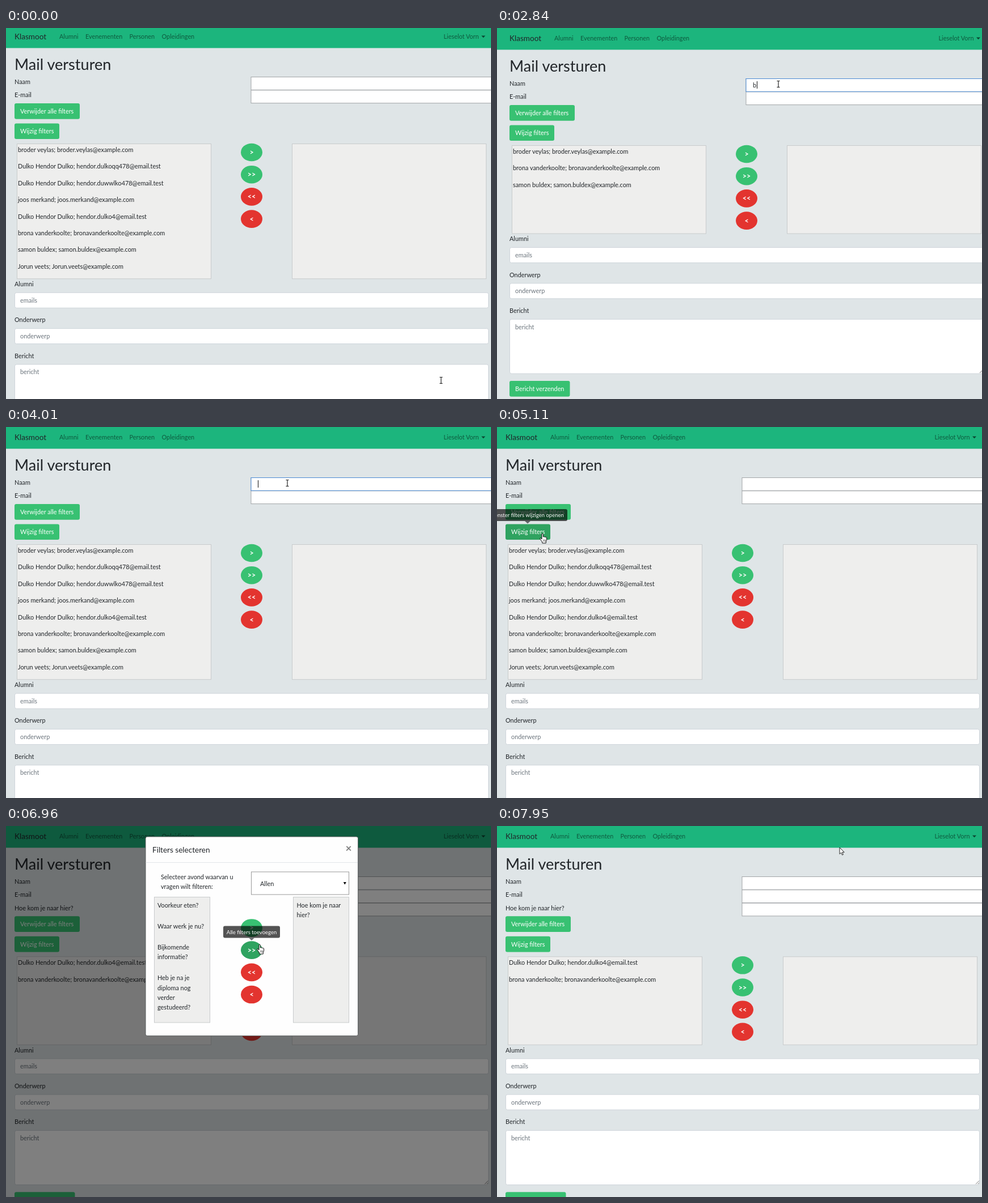
Recreate the animation shown at these times as an HTML page. Size 855 by 655 pixels, loop 8 s.

```html
<!DOCTYPE html>
<html lang="nl">
<head>
<meta charset="utf-8">
<title>Mail versturen</title>
<style>
html, body { margin: 0; width: 100%; height: 100%; overflow: hidden; background: #dfe5e7; }
svg { display: block; width: 855px; height: 655px; font: 10.86px Lato, sans-serif; fill: #212529; }
</style>
</head>
<body>
<svg id="stage" viewBox="0 0 855 655" xmlns="http://www.w3.org/2000/svg"></svg>
<script>
const LOOP = 8000;
const GREEN = '#38c172', HOVER = '#2fa360', RED = '#e3342f', HINT = '#6c757d';
const ROW = 23.3, LINE = 17.35, CIRCLE_GAP = 39.2;
const stage = document.getElementById('stage');

const people = [
  'broder veylas; broder.veylas@example.com',
  'Dulko Hendor Dulko; hendor.dulkoqq478@email.test',
  'Dulko Hendor Dulko; hendor.duwwlko478@email.test',
  'joos merkand; joos.merkand@example.com',
  'Dulko Hendor Dulko; hendor.dulko4@email.test',
  'brona vanderkoolte; bronavanderkoolte@example.com',
  'samon buldex; samon.buldex@example.com',
  'Jorun veets; Jorun.veets@example.com'
];
const questions = [
  ['Voorkeur eten?'],
  ['Waar werk je nu?'],
  ['Hoe kom je naar', 'hier?'],
  ['Bijkomende', 'informatie?'],
  ['Heb je na je', 'diploma nog', 'verder', 'gestudeerd?']
];
const CHOSEN = 2;

// [time, typed value]
const typing = [[0, ''], [1600, 'b'], [1770, 'br'], [2840, 'b'], [3010, ''],
  [3160, 's'], [3310, 'sa'], [3860, 's'], [4010, '']];
const caretX = { '': 0, b: 7, br: 11, s: 5, sa: 11 };
const caretOff = [[1310, 1600], [2300, 2760], [4560, 5060]];

// [start, end, steps, from, to]
const moves = [
  [70, 760, 10, [767, 622], [496, 99]],
  [4410, 5030, 9, [496, 99], [80, 188]],
  [5640, 6010, 6, [80, 188], [307, 222]],
  [6320, 6880, 8, [307, 222], [447, 209]],
  [7120, 7800, 10, [447, 209], [604, 38]]
];

const within = (v, a, b) => v >= a && v < b;
const inBox = ([x, y], l, t, r, b) => within(x, l, r) && within(y, t, b);
const lastBefore = (list, t) => list.filter(e => e[0] <= t).pop()[1];

function pointer(t) {
  let at = moves[0][3];
  for (const [start, end, n, a, b] of moves) {
    if (t < start) break;
    const step = Math.floor((t - start) / (end - start) * (n - 1) + 1e-6) + 1;
    const p = Math.min(step / n, 1), e = p * p * (3 - 2 * p);
    at = a.map((v, i) => v + (b[i] - v) * e);
  }
  return at;
}

const esc = s => s.replace(/</g, '&lt;').replace(/>/g, '&gt;');
const text = (x, y, s, attrs = '') => `<text x="${x}" y="${y}" ${attrs}>${esc(s)}</text>`;
const rect = (x, y, w, h, fill, attrs = '') =>
  `<rect x="${x}" y="${y}" width="${w}" height="${h}" fill="${fill}" ${attrs}/>`;
const box = (x, y, w, h, fill, line, r = 0) => rect(x, y, w, h, fill, `stroke="${line}" rx="${r}"`);
const button = (y, w, label, hot) =>
  rect(15, y, w, 27.7, hot ? HOVER : GREEN, 'rx="3"') + text(25, y + 18, label, 'fill="#fff"');
const listBox = (x, y, w, h) => box(x, y, w, h, '#eeeeed', '#c8cbcc');
const field = (y, h, hint) =>
  box(15.5, y, 835, h, '#fff', '#ced4da', 3) + text(25, y + 17.5, hint, `fill="${HINT}"`);

function circles(y, hot) {
  return ['>', '>>', '<<', '<'].map((s, i) => {
    const cy = y + i * CIRCLE_GAP;
    const fill = i > 1 ? RED : i === hot ? HOVER : GREEN;
    return `<ellipse cx="433" cy="${cy}" rx="19" ry="15.8" fill="${fill}"/>` +
      text(433, cy + 4.5, s, 'fill="#fff" font-size="12.5" font-weight="700" text-anchor="middle"');
  }).join('');
}

function tooltip(cx, y, w, label, opacity) {
  if (!opacity) return '';
  return `<g opacity="${opacity}">` + rect(cx - w / 2, y, w, 21, '#000', 'rx="3"') +
    `<path d="M${cx - 5} ${y + 21}h10l-5 4.5z"/></g>` +
    text(cx, y + 14, label, `fill="#fff" font-size="9.5" text-anchor="middle" opacity="${Math.min(1, opacity * 1.5)}"`);
}

function page(s) {
  const names = s.filtered ? [people[4], people[5]] : people.filter(p => p.split(';')[0].includes(s.typed));
  const shift = s.filtered ? ROW : 0;
  const top = 207.5 + shift;
  const height = Math.max(155.5, names.length * 29.43 + 2.8);
  const end = top + height;
  const labels = ['Naam', 'E-mail'].concat(s.filtered ? ['Hoe kom je naar hier?'] : []);
  const link = 'fill="#000" fill-opacity=".5"';
  let out = rect(-10, -5, 880, 43.4, '#1cb57d') +
    text(15, 23, 'Klasmoot', 'font-size="13.57"') +
    text(94, 22, 'Alumni', link) + text(140, 22, 'Evenementen', link) +
    text(217.5, 22, 'Personen', link) + text(274.5, 22, 'Opleidingen', link) +
    text(833.5, 22, 'Lieselot Vorn', link + ' text-anchor="end"') +
    `<path d="M838 16.5h7l-3.5 3.7z" fill="#000" fill-opacity=".6"/>` +
    text(15, 76.5, 'Mail versturen', 'font-size="27.1"');
  labels.forEach((l, i) => {
    out += text(15, 102 + i * ROW, l) + box(432, 89.5 + i * ROW, 440, 22.8, '#fff', '#a2a6a8');
  });
  if (s.focus) {
    out += box(432, 89.5, 440, 22.8, '#fff', '#4a8ad4') + text(444, 105, s.typed);
    if (s.caret) out += rect(444 + caretX[s.typed], 94, 1, 13, '#111');
  }
  out += button(136 + shift, 115, 'Verwijder alle filters') +
    button(171.4 + shift, 79, 'Wijzig filters', s.hotFilters) +
    listBox(19.5, top, 342, height) + listBox(504.5, top, 342, height) +
    names.map((n, i) => text(21, top + 14.3 + i * 29.43, n)).join('') +
    circles(top + 15, -1) +
    text(15, end + 13.3, 'Alumni') + field(end + 24.5, 27, 'emails') +
    text(15, end + 76.6, 'Onderwerp') + field(end + 87.8, 27, 'onderwerp') +
    text(15, end + 140, 'Bericht') + field(end + 151.2, 96, 'bericht') +
    `<path d="M844 ${end + 246}l6-6M847.5 ${end + 246}l2.500-2.500" stroke="#555" stroke-width=".8"/>` +
    button(end + 260, 106.5, 'Bericht verzenden');
  return `<g transform="translate(${s.dx} ${s.dy})">${out}</g>`;
}

function question(lines, x, y) {
  return lines.map((l, i) => text(x, y + i * LINE, l)).join('');
}

function modal(s) {
  const left = s.filtered ? questions.filter((q, i) => i !== CHOSEN) : questions;
  const height = s.filtered ? 221.5 : 275.5;
  const mid = 125.5 + height / 2;
  let y = 144, items = '';
  for (const q of left) {
    items += question(q, 267, y);
    y += q.length * LINE + 19.6;
  }
  if (s.filtered) items += question(questions[CHOSEN], 512.5, 144);
  return rect(0, 0, 855, 655, '#000', 'opacity=".5"') +
    box(246, 18.9, 374.6, 130 + height, '#fefefe', '#5b5e5f', 3) +
    text(258, 46.5, 'Filters selecteren', 'font-size="13.57"') +
    rect(246.5, 64, 373.6, 1, '#e1e5e8') +
    text(604, 45.5, '×', `font-size="19" font-weight="700" text-anchor="middle" fill="#000" fill-opacity="${s.hotClose ? .75 : .5}"`) +
    text(273, 93.800, 'Selecteer avond waarvan u') + text(273, 111, 'vragen wilt filteren:') +
    box(432.5, 81, 172, 40, '#fff', '#999') + text(448, 105.5, 'Allen') +
    '<path d="M594.800 99h5l-2.500 4.500z" fill="#000"/>' +
    listBox(261.5, 125.5, 98, height) + listBox(506.5, 125.5, 98, height) +
    items + circles(mid - 56.3, s.hotAdd ? 1 : -1);
}

const shapes = {
  arrow: '<path d="M0 0v11.500l2.700-2.500 1.800 4.200 1.900-.8-1.800-4.100h3.600z" fill="#fff" stroke="#111" stroke-width=".9"/>',
  beam: '<path d="M-2.500-5.500h1.800l.7.600.7-.600h1.800M0-5v10M-2.500 5.500h1.800l.7-.600.7.600h1.800" fill="none" stroke="#111" stroke-width="1.100"/>',
  hand: '<path d="M-1 1q1.200-1.800 2.400 0v5q1.200-.9 2.300.2 1.200-.7 2.200.4 1.500-.3 1.700 1.200v3.700l-1.300 2.800v2.700h-6.500v-2l-4-5.500q-.6-1.700 1.100-1.600l2.100 2z" fill="#fff" stroke="#111" stroke-width="1"/>' +
    '<path d="M1.800 10.500v4M3.700 10.500v4M5.600 10.500v4" stroke="#111" stroke-width=".6"/>'
};

function cursorShape(t, at) {
  const [, y] = at;
  if (t < 4010) {
    const onField = [[84, 133], [467, 494], [530, 558], [594, 655]].some(r => within(y, ...r));
    return onField ? 'beam' : 'arrow';
  }
  if (t < 5190) {
    if (inBox(at, 15, 171, 94, 199)) return 'hand';
    return inBox(at, 432, 89, 855, 136) ? 'beam' : 'arrow';
  }
  if (t < 5490) return 'hand';
  if (t >= 7950) return 'arrow';
  const hot = inBox(at, 262, 126, 360, 400) || inBox(at, 416, 203, 451, 234) || inBox(at, 597, 30, 612, 48);
  return hot ? 'hand' : 'arrow';
}

function draw(t) {
  const at = pointer(t), typed = lastBefore(typing, t);
  const open = within(t, 5190, 7950), filtered = t >= 6240;
  const s = {
    typed, filtered,
    dx: typed ? 7 : 0,
    dy: t < 1600 ? -3 : 0,
    focus: within(t, 760, 5110),
    caret: !caretOff.some(r => within(t, ...r)),
    hotFilters: t < 5260 && inBox(at, 15, 171, 94, 199),
    hotAdd: filtered && inBox(at, 416, 203, 451, 234),
    hotClose: inBox(at, 597, 30, 612, 48)
  };
  const openTip = lastBefore([[0, 0], [5030, .3], [5110, .66], [5190, .9], [5260, .45], [5340, 0]], t);
  const addTip = lastBefore([[0, 0], [6880, .3], [6960, .67], [7040, .9], [7120, .45], [7200, 0]], t);
  return page(s) + (open ? modal(s) : '') +
    tooltip(54, 145, 140, 'Venster filters wijzigen openen', openTip) +
    tooltip(433, 176.5, 100, 'Alle filters toevoegen', addTip) +
    `<g transform="translate(${at.map(v => v.toFixed(1)).join(' ')})">${shapes[cursorShape(t, at)]}</g>`;
}

let shown = '';
const begin = performance.now();
function tick() {
  const next = draw((performance.now() - begin) % LOOP);
  if (next !== shown) stage.innerHTML = shown = next;
  requestAnimationFrame(tick);
}
tick();
</script>
</body>
</html>
```
